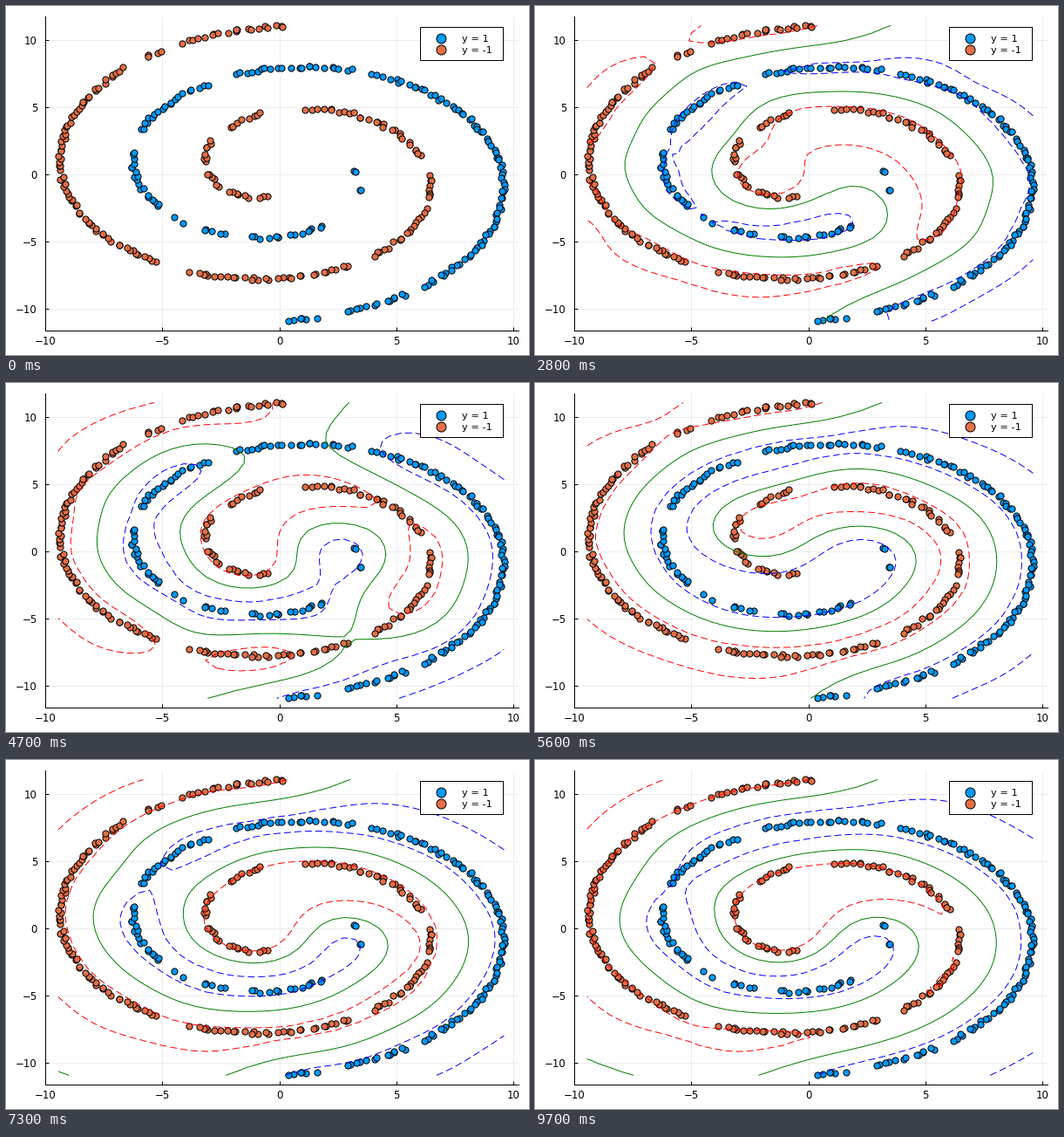
Animation, 600 px wide and 400 px high, one loop 9.8 s. Source, as a matplotlib script:

```python
import numpy as np
import matplotlib.pyplot as plt
from matplotlib.animation import FuncAnimation
from matplotlib.collections import LineCollection
from matplotlib.patches import Rectangle

W, H, DPI = 600, 400, 100
STEPS, STEP_MS = 98, 100
LEFT, TOP, AX_W, AX_H = 44.5, 12, 543.5, 359.5
BLUE, RED = "#009afa", "#e36f47"
PX = 72 / DPI  # one pixel in points

plt.rcParams["font.family"] = "DejaVu Sans"

# Angles where each spiral arm is bare
BLUE_GAPS = [(3.16, 3.4), (3.55, 3.8), (3.84, 4.25), (5.0, 5.2), (5.38, 5.53), (5.65, 5.84),
             (6.53, 6.75), (7.42, 7.57), (8.24, 8.34), (10.38, 10.46), (10.76, 10.85)]
RED_GAPS = [(3.2, 3.38), (3.88, 4.07), (4.54, 4.85), (6.13, 6.25), (6.55, 6.69), (7.29, 7.4),
            (8.35, 8.48), (10.3, 10.42), (10.5, 10.58)]


def spiral(start, end, count, gaps, sign, rng):
    """Noisy arm with radius equal to its angle, evenly dense along its length."""
    u = (np.arange(count) + rng.uniform(-0.7, 0.7, count)) / (count - 1)
    t = np.sqrt(start ** 2 + np.clip(u, 0, 1) * (end ** 2 - start ** 2))
    for a, b in gaps:
        t = t[(t < a) | (t > b)]
    arm = sign * np.column_stack([-t * np.cos(t), t * np.sin(t)])
    return arm + rng.uniform(0, 0.2, arm.shape)


rng = np.random.default_rng(4)
blue_pts = spiral(3.03, 10.97, 235, BLUE_GAPS, 1, rng)
red_pts = spiral(1.84, 11.01, 250, RED_GAPS, -1, rng)
points = np.vstack([blue_pts, red_pts])
labels = np.r_[np.ones(len(blue_pts)), -np.ones(len(red_pts))]

fig = plt.figure(figsize=(W / DPI, H / DPI), dpi=DPI, facecolor="white")
ax = fig.add_axes([LEFT / W, 1 - (TOP + AX_H) / H, AX_W / W, AX_H / H])
ax.set(xlim=(-10.02, 10.22), ylim=(-11.62, 11.78),
       xticks=range(-10, 11, 5), yticks=range(-10, 11, 5))
ax.spines[["top", "right"]].set_visible(False)
ax.spines[["left", "bottom"]].set_linewidth(PX)
ax.tick_params(direction="in", length=4 * PX, width=PX, labelsize=8.5)
ax.tick_params(axis="x", pad=7 * PX)
ax.tick_params(axis="y", pad=8.5 * PX)
ax.grid(color="black", alpha=0.1, linewidth=0.5)
ax.set_axisbelow(True)

dot = dict(marker="o", ls="", mec="black", mew=PX)
ax.plot(*blue_pts.T, color=BLUE, ms=7.2 * PX, zorder=3, **dot)
ax.plot(*red_pts.T, color=RED, ms=7.2 * PX, zorder=3, **dot)

LEVELS = (-1, 0, 1)
DASHED = (0, (8, 4))
strokes = []
for color, style in [("red", DASHED), ("green", "solid"), ("blue", DASHED)]:
    stroke = LineCollection([], colors=color, linestyles=[style], linewidths=PX, zorder=4)
    ax.add_collection(stroke, autolim=False)
    strokes.append(stroke)

# Legend, laid out in stage pixels
stage = fig.add_axes([0, 0, 1, 1], zorder=5)
stage.set(xlim=(0, W), ylim=(H, 0))
stage.axis("off")
stage.add_patch(Rectangle((475, 24), 95, 38, fc="white", ec="black", lw=PX))
for y, color, text in [(37, BLUE, "y = 1"), (50, RED, "y = -1")]:
    stage.plot(499, y, color=color, ms=11 * PX, **dot)
    stage.text(523, y + 4, text, fontsize=8.2, va="baseline")

# The contours are cut off at the extent of the data
gx = np.linspace(-9.45, 9.6, 40)
gy = np.linspace(-10.96, 11.1, 40)
grid = np.stack(np.meshgrid(gx, gy), axis=-1).reshape(-1, 2)


def kernel(a, b, scale):
    d2 = ((a[:, None] - b[None]) ** 2).sum(-1)
    return np.exp(-d2 / (2 * scale ** 2))


def contours(step):
    """Margins of a kernel classifier fitted to a fresh random batch."""
    u = step / (STEPS - 1)
    size = int(50 + 70 * u)
    batch = np.random.default_rng(100 + step).choice(len(points), size, replace=False)
    p, scale = points[batch], 1.8 + 0.6 * u
    weights = np.linalg.solve(kernel(p, p, scale) + 0.1 * np.eye(size), labels[batch])

    # The mean margin grows, then the boundary drifts in favour of blue
    margin = np.mean(labels * (kernel(points, p, scale) @ weights))
    gain = min(1.15, 0.92 + 0.35 * u) / margin
    field = gain * kernel(grid, p, scale) @ weights + 0.18 * u ** 4

    cs = ax.contour(gx, gy, field.reshape(len(gy), len(gx)), levels=LEVELS)
    segs = cs.allsegs
    cs.remove()
    return segs


def update(step):
    curves = contours(step) if step else [[], [], []]
    for stroke, segs in zip(strokes, curves):
        stroke.set_segments(segs)
    return strokes


anim = FuncAnimation(fig, update, frames=STEPS, interval=STEP_MS, repeat=True, repeat_delay=0, blit=False)
plt.show()
```
